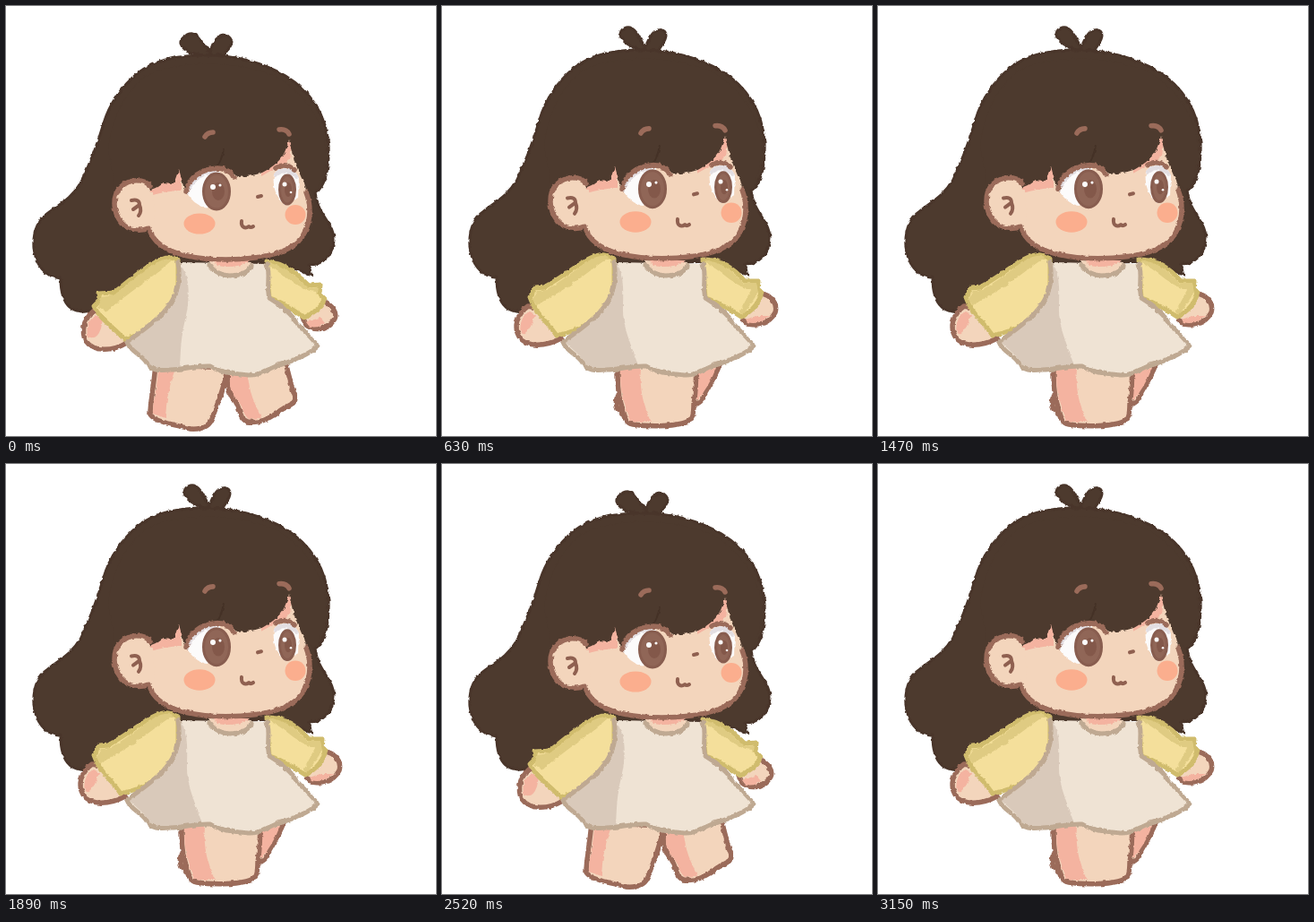
These frames come from a looping animation (480x480 px, 3.36 s). An HTML page:

```html
<!DOCTYPE html>
<html lang="en">
<head>
<meta charset="utf-8">
<title>Walking girl</title>
<style>
  html, body { margin: 0; width: 100%; height: 100%; overflow: hidden; background: #fff; }
  svg { display: block; width: 100vw; height: 100vh; }
  path { stroke-linecap: round; stroke-linejoin: round; }
  .pose { animation: swap 420ms step-end infinite; }
  .step { animation-delay: -210ms; }
  @keyframes swap { 0% { visibility: visible; } 50%, 100% { visibility: hidden; } }

  .hair { fill: #4d3a2e; stroke: #49352a; stroke-width: 3; }
  .bangs { fill: #4d3a2e; }
  .strand { fill: none; stroke: #443126; stroke-width: 2; }
  .skin { fill: #f3d5bc; }
  .line { fill: none; stroke: #9b6b5a; stroke-width: 5.5; }
  .limb { fill: #f3d5bc; stroke: #9b6b5a; stroke-width: 5.5; }
  .pink { fill: #f4b3a0; }
  .blush { fill: #fbae8e; }
  .sleeve { fill: #f4df9b; stroke: #d0bc6d; stroke-width: 5; }
  .fold { fill: #dfcb82; }
  .dress { fill: #efe3d4; }
  .shade { fill: #d9c9ba; }
  .hem { fill: none; stroke: #bfa992; stroke-width: 5; }
  .white { fill: #fcfbfb; }
  .lidShade { fill: #e3dee2; }
  .iris { fill: #906657; stroke: #885d4f; stroke-width: 3; }
  .pupil { fill: #83584a; }
  .mark { fill: none; stroke: #8f6050; stroke-width: 4; }
</style>
</head>
<body>
<svg viewBox="0 0 480 480">
  <defs>
    <filter id="crayon" x="0" y="0" width="480" height="480" filterUnits="userSpaceOnUse" color-interpolation-filters="sRGB">
      <feTurbulence type="fractalNoise" baseFrequency=".2" numOctaves="2" seed="7"/>
      <feDisplacementMap in="SourceGraphic" scale="3.5" xChannelSelector="R" yChannelSelector="G"/>
    </filter>

    <path id="backHair" class="hair" d="M222 55C195 55 166 60 147 75C128 91 116 108 109 131C102 155 94 176 83 198C73 215 60 221 47 231C34 240 30 254 31 270C33 288 43 303 61 304C61 318 63 329 71 336C79 342 90 343 100 338L130 320L190 290L300 286L325 294L341 301L338 289C354 289 364 279 366 262C367 243 348 234 345 209C356 202 361 182 360 156C358 122 340 95 312 78C288 64 256 55 222 55Z"/>

    <g id="head">
      <g filter="url(#crayon)">
        <path class="skin" d="M158 190L158 248C165 270 190 279 222 282C260 285 300 281 320 268C337 256 343 232 335 206L320 140L200 160Z"/>
        <path class="pink" d="M160 212Q180 206 196 206L196 178L160 196ZM285 190Q302 180 317 172L320 146L285 180Z"/>
        <path class="white" d="M201 207C202 192 216 182 238 182L240 226C222 228 209 222 201 207ZM299 188C304 179 321 178 327 192L326 214L312 222C302 214 297 203 299 188Z"/>
        <path class="lidShade" d="M202 204C204 192 216 182 238 182L232 187C219 189 212 194 206 205ZM299 188C304 179 321 178 327 192L324 193C316 185 307 184 300 192Z"/>
        <path class="line" d="M161 252C167 269 190 279 222 282C260 285 300 281 320 268C337 257 344 231 335 208"/>
        <path class="bangs" d="M159 206L167 203L174 198L187 199L193 182L199 205C206 188 220 181 238 180C250 181 256 188 259 191Q275 190 286 186Q302 178 309 167Q313 160 316 149Q319 167 326 183Q333 202 344 208C357 190 359 166 354 142C344 112 325 92 300 78C260 62 195 58 156 78C132 98 118 125 114 160L122 206Z"/>
        <path class="strand" d="M243 160Q241 171 236 178"/>
        <path class="line" d="M201 207C204 191 218 182 237 181C247 182 252 186 254 191M301 181Q311 174 322 183"/>
        <path class="limb" d="M161 201C153 192 138 193 128 202C118 212 119 230 129 242C137 251 150 252 159 248"/>
        <path class="skin" d="M157 207L164 208L166 243L157 246Z"/>
      </g>
      <ellipse class="iris" cx="235" cy="207" rx="14.5" ry="20"/>
      <ellipse class="iris" cx="314" cy="205" rx="8.5" ry="16"/>
      <ellipse class="pupil" cx="237" cy="207" rx="7" ry="10"/>
      <ellipse class="pupil" cx="315" cy="205" rx="4" ry="8"/>
      <g class="white">
        <circle cx="231" cy="202" r="3"/><circle cx="239" cy="200" r="1.6"/>
        <circle cx="311" cy="199" r="2.5"/><circle cx="318" cy="208" r="1.3"/>
      </g>
      <ellipse class="blush" cx="216" cy="243" rx="17.5" ry="11.5"/>
      <ellipse class="blush" cx="323" cy="233" rx="11.5" ry="11"/>
      <path class="mark" d="M140 217Q149 215 149 222L142 227M149 222Q152 229 148 234"/>
      <path class="line" d="M222 146Q225 141 231 141M305 138Q313 137 316 143"/>
      <path class="mark" d="M281 213L285 212"/>
      <path class="mark" d="M263 240C262 247 267 249 271 246Q273 248 276 246"/>
    </g>

    <path id="skirt" d="M192 286C196 310 190 326 176 342C166 353 150 364 135 375C138 385 151 389 156 397C161 408 172 407 184 406C198 406 212 401 228 402C240 410 256 410 270 412C283 413 290 406 304 401C318 397 335 391 348 380C344 372 330 361 323 352C316 340 306 333 294 326C290 313 296 300 291 288"/>
    <g id="collar">
      <path class="skin" d="M226 284Q234 300 250 301Q268 301 274 286Z"/>
      <path class="pink" d="M232 284L236 290Q254 293 268 287L272 284Z"/>
      <path class="hem" d="M227 289Q234 300 250 301Q268 301 274 290"/>
    </g>
  </defs>

  <g class="pose">
    <g filter="url(#crayon)">
      <path class="hair" d="M225 55C212 55 198 51 195 42C194 36 200 34 202 32C208 28 216 34 219 41Q225 46 228 53Q229 45 233 39C239 31 249 31 252 39C252 46 246 50 244 54Z"/>
      <use href="#backHair"/>
      <path class="limb" d="M98 340C86 350 84 364 89 374C98 387 120 385 135 376L125 345Z"/>
      <path class="pink" d="M100 345C90 352 89 362 92 369Q101 374 106 360L108 350Z"/>
      <path class="limb" d="M354 329C364 334 370 342 367 349C360 361 345 364 335 356L330 345Z"/>
      <path class="pink" d="M334 353L351 348L356 354Q346 361 337 357Z"/>

      <path class="limb" d="M167 400C165 425 161 440 161 456C168 466 190 467 205 472C218 473 228 470 231 458C235 445 243 432 247 404Z"/>
      <path class="pink" d="M170 405L189 405C182 424 179 440 178 460L164 455C164 440 169 425 170 405Z"/>
      <path class="limb" d="M249 404C245 420 248 432 255 440C262 448 260 462 270 464C285 466 294 460 303 454C312 446 324 446 323 436C318 424 316 412 312 398Z"/>
      <path class="pink" d="M251 408L270 409C270 430 279 446 285 460L271 461C264 456 264 445 257 438C249 430 249 420 251 408Z"/>

      <path class="sleeve" d="M192 284C180 276 165 286 151 296C139 304 128 315 120 320L103 321L105 328L98 335C105 350 120 358 132 372C152 368 178 350 192 326Z"/>
      <path class="fold" d="M186 283C176 280 165 288 151 298C138 308 130 318 118 323L106 325L103 337L113 341C123 330 160 306 186 283Z"/>
      <path class="sleeve" d="M291 285C312 287 326 300 338 312L351 311L350 321L356 327C352 338 341 343 333 348C320 339 308 330 294 326Z"/>
      <path class="fold" d="M294 287C312 290 326 304 338 315L349 314L348 319C328 319 314 302 294 290Z"/>

      <use href="#skirt" class="dress"/>
      <path class="shade" d="M193 288C207 300 205 330 200 350C195 370 195 386 194 404C176 408 164 407 158 398C152 388 139 384 136 374C164 356 184 340 191 321Z"/>
      <use href="#collar"/>
      <use href="#skirt" class="hem"/>
    </g>
    <use href="#head"/>
  </g>

  <g class="pose step">
    <g filter="url(#crayon)">
      <path class="hair" d="M223 50C211 45 200 40 199 32C199 25 207 22 212 25C219 29 221 37 227 47Q230 37 235 31C240 25 250 25 250 33C250 40 243 45 241 51Z"/>
      <use href="#backHair" transform="translate(0 -7.14) scale(1 1.021)"/>
      <path class="limb" d="M96 335C83 345 80 358 86 369C95 382 116 380 133 371L122 340Z"/>
      <path class="pink" d="M97 341C88 347 86 358 88 365Q95 368 101 353L104 345Z"/>
      <path class="limb" d="M357 321C367 323 375 332 372 342C366 354 350 360 338 353L334 344Z"/>
      <path class="pink" d="M338 350L352 346L365 346Q353 357 341 353Z"/>

      <path class="limb" d="M311 398C306 411 299 423 294 432C291 441 286 445 280 444L282 402Z"/>
      <path class="pink" d="M285 408L306 404Q298 425 285 440Z"/>
      <path class="limb" d="M201 433C194 434 193 442 196 450L206 459Z"/>
      <path class="limb" d="M196 400C196 418 196 432 200 444C202 455 203 465 213 467C232 470 255 469 268 466C281 463 281 455 281 444C284 430 283 416 284 402Z"/>
      <path class="pink" d="M199 404L222 404C220 428 225 446 233 464L213 464C206 460 206 452 204 444C199 430 199 418 199 404Z"/>

      <path class="sleeve" d="M192 283C180 272 165 280 151 290C138 299 126 307 114 314L104 315L98 325C104 343 118 353 128 368C152 363 178 350 192 325Z"/>
      <path class="fold" d="M187 280C176 276 166 282 153 292C139 302 128 310 116 317L106 318L101 327L106 335L113 329C137 318 164 296 187 280Z"/>
      <path class="sleeve" d="M291 283C311 282 326 293 338 307L353 307L352 315L357 320C353 334 344 342 334 347C320 338 308 330 294 326Z"/>
      <path class="fold" d="M294 284C312 285 326 298 337 310L351 309L353 320L336 345L332 342L345 317C326 313 311 294 294 287Z"/>

      <use href="#skirt" class="dress"/>
      <path class="shade" d="M194 286C202 297 203 314 202 334C201 360 212 378 219 402C201 404 184 407 169 405C158 400 158 392 149 386L136 374C164 356 184 340 191 321Z"/>
      <use href="#collar"/>
      <use href="#skirt" class="hem"/>
    </g>
    <use href="#head" transform="translate(0 -7.14) scale(1 1.021)"/>
  </g>
</svg>
</body>
</html>
```
